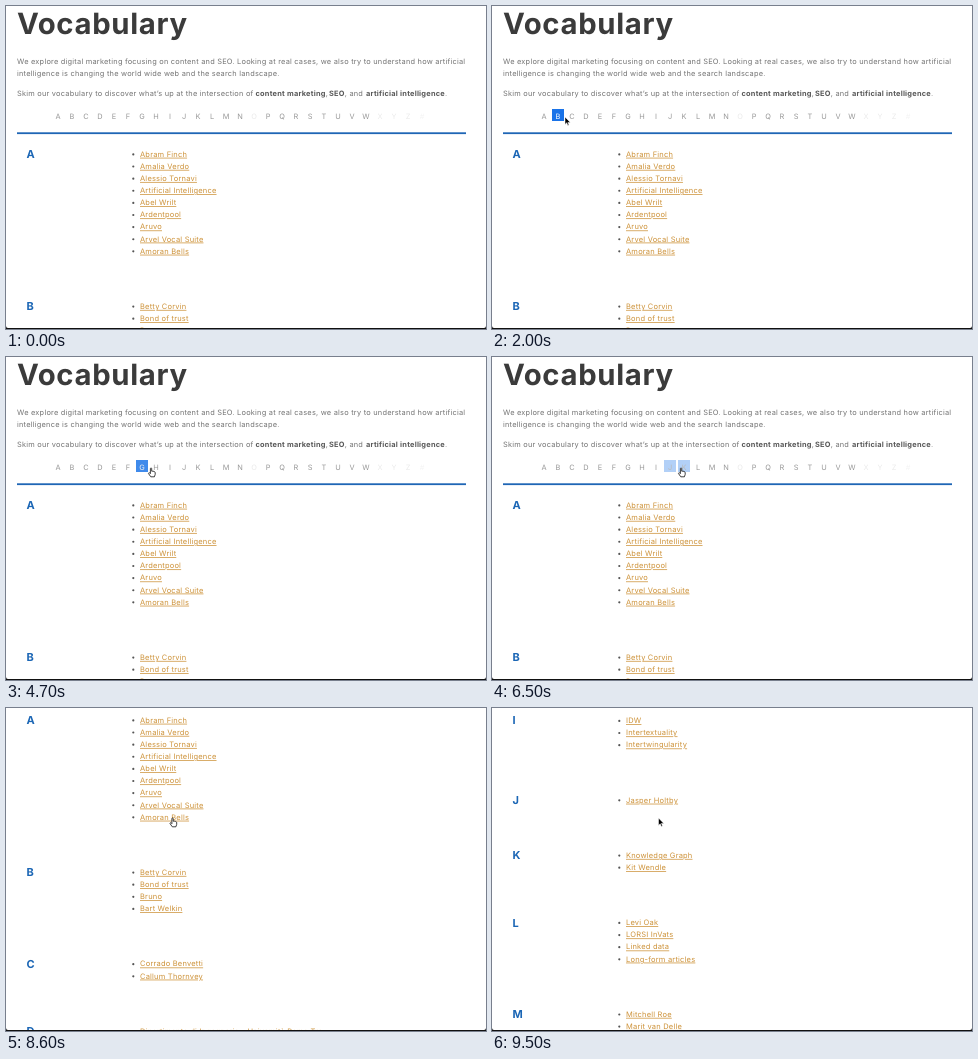
An HTML page for the animation above (10000 ms loop, 480 px wide and 323 px high).

```html
<!DOCTYPE html>
<html lang="en">
<head>
<meta charset="utf-8">
<title>Vocabulary</title>
<style>
html, body { margin: 0; width: 100%; height: 100%; overflow: hidden; background: #fff; }
svg { display: block; width: 480px; height: 323px; }
text { font: 7.4px Inter, "Open Sans", sans-serif; letter-spacing: .23px; fill: #747474; text-rendering: geometricPrecision; white-space: pre; }
.title { font-size: 29.3px; font-weight: 700; letter-spacing: .65px; fill: #3b3b3b; }
.bold { font-weight: 700; fill: #585858; }
.head { font-size: 11px; font-weight: 700; fill: #1b66b5; letter-spacing: 0; }
.link { font-size: 7.5px; letter-spacing: .2px; fill: #cd9239; text-decoration: underline; text-decoration-thickness: .6px; text-decoration-skip-ink: none; }
.key { text-anchor: middle; letter-spacing: 0; }
</style>
</head>
<body>
<svg viewBox="0 0 480 323">
  <g id="page">
    <text class="title" x="11" y="28">Vocabulary</text>
    <text x="11" y="57.9">We explore digital marketing focusing on content and SEO. Looking at real cases, we also try to understand how artificial</text>
    <text x="11" y="70.2">intelligence is changing the world wide web and the search landscape.</text>
    <text x="11" y="90.2">Skim our vocabulary to discover what’s up at the intersection of <tspan class="bold" x="249.5">content marketing</tspan>, <tspan class="bold" x="323">SEO</tspan>, and <tspan class="bold" x="360">artificial intelligence</tspan>.</text>
    <rect x="11" y="126.3" width="449" height="1.8" fill="#1f66b5"/>
  </g>
  <path d="M0 320Q0 322 2 322H478Q480 322 480 320V323H0Z" fill="#111"/>
  <g id="cursor" stroke-linejoin="round">
    <path id="arrow" d="M0 0V7.4L1.7 5.8 2.8 8.4 4 7.9 2.9 5.4H5.3Z" fill="#000" stroke="#fff" stroke-width=".5"/>
    <path id="hand" d="M-.6 .6C-.6-.3 .7-.3 .7 .6V3.2C2.4 3 4.2 3.5 4.2 4.7V6.4L3.4 8.8H-.2L-2.4 5.7C-2.8 4.8-1.7 4.3-1.2 5L-.6 5.6Z" fill="#fff" stroke="#111" stroke-width=".8"/>
  </g>
</svg>
<script>
const $ = id => document.getElementById(id);
const page = $('page');

function add(tag, attrs, text = '') {
  const el = document.createElementNS('http://www.w3.org/2000/svg', tag);
  for (const k in attrs) el.setAttribute(k, attrs[k]);
  el.textContent = text;
  page.append(el);
  return el;
}

const sections = {
  A: 'Abram Finch|Amalia Verdo|Alessio Tornavi|Artificial Intelligence|Abel Wrilt|Ardentpool|Aruvo|Arvel Vocal Suite|Amoran Bells',
  B: 'Betty Corvin|Bond of trust|Bruno|Bart Welkin',
  C: 'Corrado Benvetti|Callum Thornvey',
  D: 'Dipartimento di Ingegneria - Università Roma Tre|Digital marketing|Dublin Core',
  E: 'Entity|Earned media|Editorial plan',
  F: 'Folksonomy|Featured snippet|Full-text search',
  G: 'Graph database|Geotagging|Glossary',
  H: 'Hypertext|HTML|Heuristics',
  I: 'IDW|Intertextuality|Intertwingularity',
  J: 'Jasper Holtby',
  K: 'Knowledge Graph|Kit Wendle',
  L: 'Levi Oak|LORSI InVats|Linked data|Long-form articles',
  M: 'Mitchell Roe|Marit van Delle|Metadata'
};
const sectionY = {};
let y = 148;
for (const name in sections) {
  sectionY[name] = y;
  add('text', { class: 'head', x: 20.5, y: y + 4 }, name);
  const items = sections[name].split('|');
  items.forEach((item, i) => {
    const row = y + i * 12.12;
    add('circle', { cx: 127.3, cy: row + .4, r: 1.1, fill: '#555' });
    add('text', { class: 'link', x: 134, y: row + 2.7 }, item);
  });
  y += 43.1 + items.length * 12.12;
}

// Index letters; those without entries stay pale
const keys = [...'ABCDEFGHIJKLMNOPQRSTUVWXYZ#'].map((name, i) => {
  const x = 52 + i * 14;
  return {
    name,
    shade: name === '#' ? 244 : 'OXYZ'.includes(name) ? 234 : 152,
    box: add('rect', { x: x - 6, y: 103, width: 12, height: 12, fill: '#1a73e8' }),
    label: add('text', { class: 'key', x, y: 113.2 }, name)
  };
});

// Letter, pointer enters, pointer leaves (ms)
const hovers = [
  ['A', 950, 1550], ['B', 1600, 2000], ['C', 2100, 2500], ['D', 2600, 2950],
  ['E', 3050, 4000], ['F', 4050, 4350], ['G', 4350, 4650], ['H', 4700, 5400],
  ['I', 5500, 5900], ['J', 6000, 6300], ['K', 6400, 7150], ['J', 7200, 7400],
  ['I', 7450, 8400], ['link', 8600, 8700]
];
const FADE = 300;

// [time, value] pairs
const tipX = [[100, 478], [800, 50], [1400, 50], [2000, 73], [2500, 86], [2600, 88], [3100, 103],
  [3500, 113.5], [3800, 113.5], [4700, 145], [4900, 149], [5200, 149], [6300, 181],
  [6500, 189], [6700, 191], [6900, 191], [7800, 166.5]];
const tipY = [[100, 318], [800, 111], [7000, 111], [7800, 110]];
const scroll = [[8200, 0], [8300, 10], [8400, 45], [8500, 92], [8600, 136], [8700, 190],
  [8900, 420], [9100, 680], [9300, sectionY.I - 12.5]];

const clamp = v => Math.max(0, Math.min(1, v));

function at(track, t) {
  const i = track.findIndex(p => p[0] > t);
  if (i < 0) return track[track.length - 1][1];
  if (i === 0) return track[0][1];
  const [t0, a] = track[i - 1], [t1, b] = track[i];
  return a + (b - a) * (t - t0) / (t1 - t0);
}

function glow(name, t) {
  return Math.max(0, ...hovers.filter(h => h[0] === name).map(([, on, off]) =>
    clamp((Math.min(t, off) - on) / FADE) - clamp((t - off) / FADE)));
}

function draw(now) {
  const t = Math.floor(now % 10000 / 100) * 100; // ten pictures a second
  for (const k of keys) {
    const o = glow(k.name, t), v = Math.round(k.shade + (255 - k.shade) * o);
    k.box.setAttribute('opacity', o);
    k.label.style.fill = `rgb(${v},${v},${v})`;
  }
  page.setAttribute('transform', `translate(0 ${-at(scroll, t)})`);

  const pointing = hovers.some(([, on, off]) => t >= on && t < off);
  $('cursor').setAttribute('transform', `translate(${at(tipX, t)} ${at(tipY, t)})`);
  $('cursor').setAttribute('visibility', t < 100 ? 'hidden' : 'visible');
  $('hand').style.display = pointing ? '' : 'none';
  $('arrow').style.display = pointing ? 'none' : '';
}

function loop() {
  draw(performance.now());
  requestAnimationFrame(loop);
}
loop();
</script>
</body>
</html>
```
